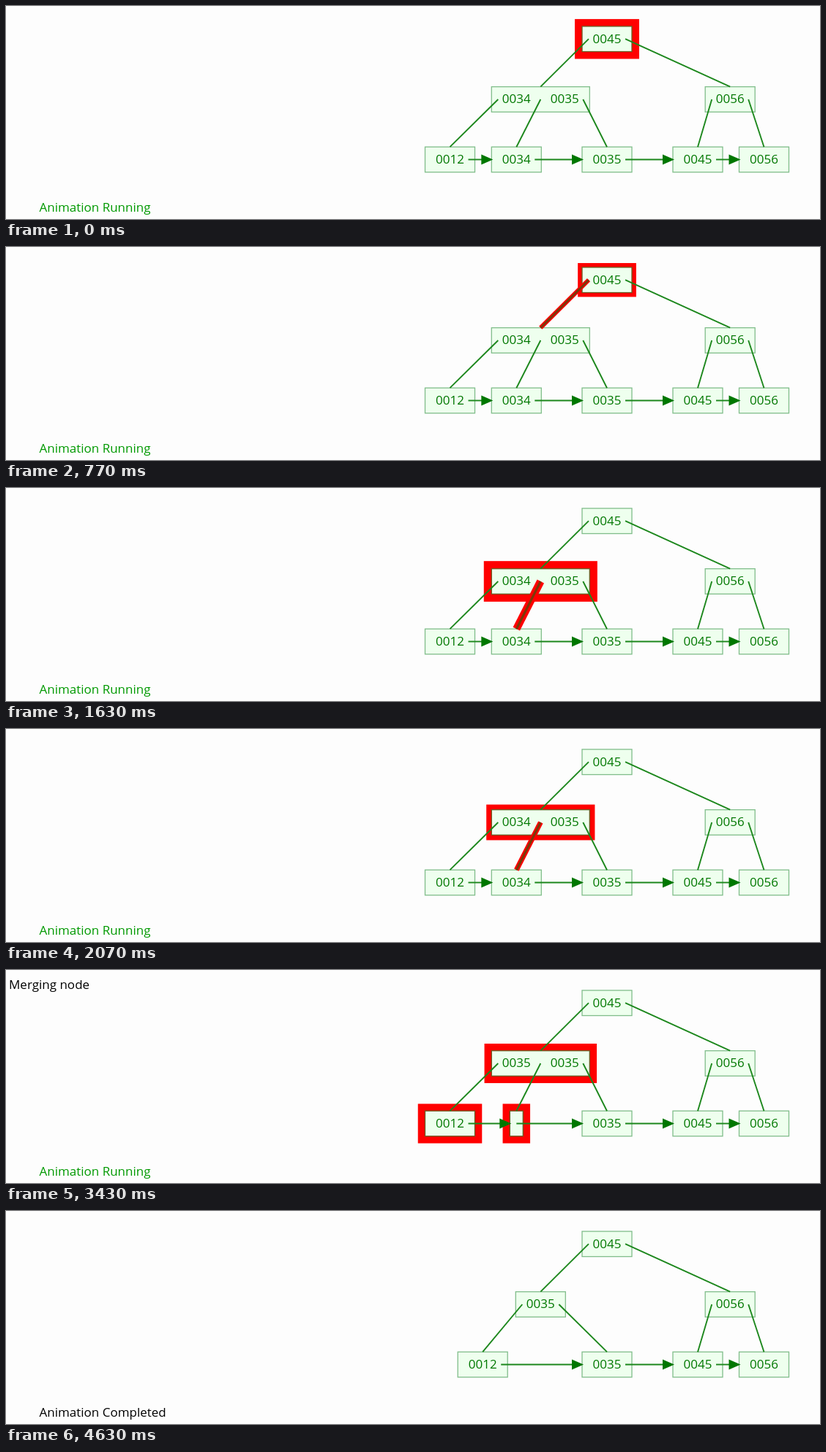
Recreate the animation shown at these times as an HTML page with a canvas. Size 1112 by 292 pixels, loop 4660 ms.

```html
<!DOCTYPE html>
<html lang="en">
<head>
<meta charset="utf-8">
<title>Tree deletion</title>
<style>
html, body { margin: 0; width: 100%; height: 100%; overflow: hidden; background: #fdfdfd; }
canvas { display: block; }
</style>
</head>
<body>
<canvas id="stage" width="1112" height="292"></canvas>
<script>
const ctx = document.getElementById('stage').getContext('2d');
const LOOP = 4660, STEP = 546.4, LEAD = 45;
const SCALE = 1.65, PULSE = 1700, PULSE_MIN = 650;
const PAPER = '#fdfdfd', FILL = '#eeffee', BORDER = '#80bd8a';
const GREEN = '#007700', LINE = '#1c871c', RED = '#ff0000';
const ROWS = [45.2, 128, 210.5], HALF = 17.3;
const KEY = 66, ATTACH = 25;

// Highlight thickness: triangle wave between 3 and 7 units
function pulse(t) {
  const phase = (((t - PULSE_MIN) / PULSE) % 1 + 1) % 1;
  return SCALE * (3 + 8 * Math.min(phase, 1 - phase));
}

function node(x, row, keys, hot = false, half = 1 + keys.length * KEY / 2) {
  return { x, y: ROWS[row], keys, hot, half };
}

function label(text, x, y, color, align = 'left') {
  ctx.fillStyle = color;
  ctx.textAlign = align;
  ctx.fillText(text, x, y);
}

function drawNode({ x, y, keys, hot, half }, glow) {
  if (hot) {
    const w = half + glow, h = HALF + glow;
    ctx.fillStyle = RED;
    ctx.fillRect(x - w, y - h, 2 * w, 2 * h);
  }
  ctx.fillStyle = FILL;
  ctx.fillRect(x - half, y - HALF, 2 * half, 2 * HALF);
  ctx.strokeStyle = hot ? '#6b5a20' : BORDER;
  ctx.lineWidth = 1.3;
  ctx.strokeRect(x - half, y - HALF, 2 * half, 2 * HALF);
  keys.forEach((key, i) =>
    label(key, x + (i - (keys.length - 1) / 2) * KEY, y + 5.4, GREEN, 'center'));
}

function line(x1, y1, x2, y2, color, width) {
  ctx.strokeStyle = color;
  ctx.lineWidth = width;
  ctx.beginPath();
  ctx.moveTo(x1, y1);
  ctx.lineTo(x2, y2);
  ctx.stroke();
}

function edge(parent, slot, child, hot, glow) {
  const n = parent.keys.length;
  const span = ATTACH + (n - 1) * KEY / 2;
  const ends = [parent.x - span + slot * 2 * span / n, parent.y, child.x, child.y - HALF];
  if (hot) line(...ends, RED, glow);
  line(...ends, hot ? '#7a3a08' : LINE, hot ? 3 : 1.9);
}

function link(from, to) {
  const start = from.x + Math.max(0, from.half - 9), tip = to.x - to.half + 2, y = from.y;
  line(start, y, tip - 8, y, LINE, 1.9);
  ctx.fillStyle = GREEN;
  ctx.beginPath();
  ctx.moveTo(tip, y);
  ctx.lineTo(tip - 16, y - 7);
  ctx.lineTo(tip - 16, y + 7);
  ctx.fill();
}

function draw(t) {
  const progress = (t + LEAD) / STEP, step = Math.floor(progress);
  const glow = pulse(t);
  const merging = step === 6, merged = step > 6;
  const shift = Math.min(1, Math.max(0, progress - 7));

  const root = node(821, 0, ['0045'], step < 2);
  const inner = node(730.3, 1, merged ? ['0035'] : [merging ? '0035' : '0034', '0035'],
    step === 2 || step === 3 || merging);
  const right = node(989.2, 1, ['0056']);
  const first = node(606.5 + 44.7 * shift, 2, ['0012'], merging);
  const gone = node(697.3, 2, step < 5 ? ['0034'] : [], step >= 4, merging ? 9 : 34);
  const rest = [[821, '0035'], [945, '0045'], [1035.5, '0056']].map(([x, key]) => node(x, 2, [key]));
  const leaves = merged ? [first, ...rest] : [first, gone, ...rest];

  ctx.fillStyle = PAPER;
  ctx.fillRect(0, 0, 1112, 292);
  ctx.font = '17px "Open Sans", "Noto Sans", sans-serif';

  [root, inner, right, ...leaves].forEach(n => drawNode(n, glow));
  edge(root, 0, inner, step === 1, glow);
  edge(root, 1, right);
  const count = leaves.length - 2;
  for (let i = 0; i < count; i++) edge(inner, i, leaves[i], step === 3 && i === 1, glow);
  edge(right, 0, rest[1]);
  edge(right, 1, rest[2]);
  for (let i = 1; i < leaves.length; i++) link(leaves[i - 1], leaves[i]);

  if (merging) label('Merging node', 4, 26.3, '#000000');
  if (step < 8) label('Animation Running', 45.5, 281.8, '#009900');
  else label('Animation Completed', 45.5, 281.8, '#000000');
}

const begin = performance.now();
function tick() {
  draw((performance.now() - begin) % LOOP);
  requestAnimationFrame(tick);
}
tick();
</script>
</body>
</html>
```
